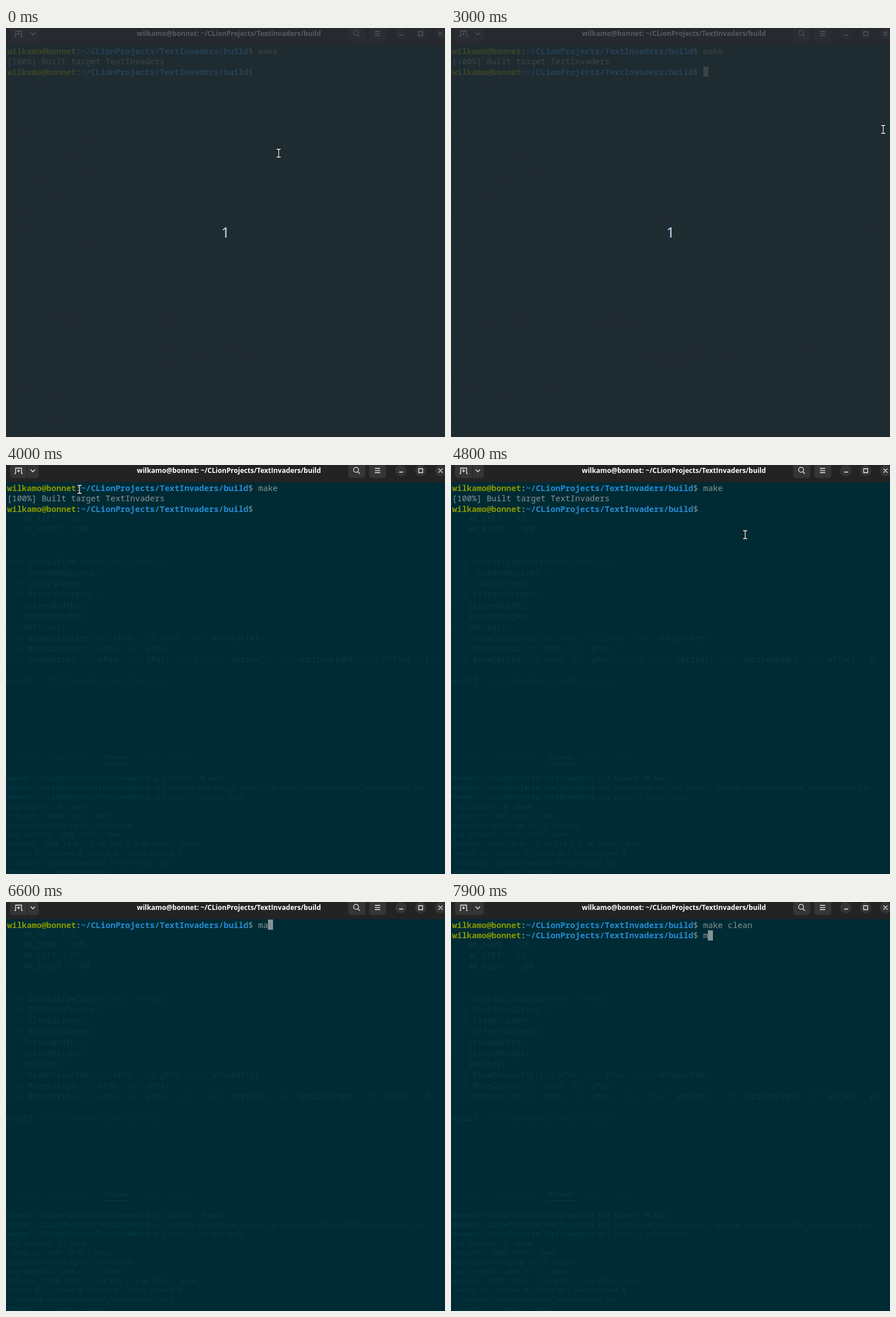
Write an HTML page with a canvas that moves like this. It is 776 by 722 pixels and loops after 8000 ms.

```html
<!DOCTYPE html>
<html lang="en">
<head>
<meta charset="utf-8">
<title>Terminal session</title>
<style>
html, body { margin: 0; width: 100%; height: 100%; overflow: hidden; background: #002b34; }
canvas { display: block; }
</style>
</head>
<body>
<canvas id="stage" width="776" height="722"></canvas>
<script>
const ctx = document.getElementById('stage').getContext('2d');
const LOOP = 8000, STEP = 100, REVEAL = 4000;
const MONO = '"Noto Sans Mono", monospace', SANS = '"Open Sans", sans-serif';
const USER = 'wilkamo', HOST = 'bonnet', PROJECT = '~/CLionProjects/TextInvaders';
const REPO = `https://github.com/${USER}/CPP_TextInvaders.git`;
const CELL = 8.7, LEFT = 2, TOP = 31.4, ROW = 18.3;
const GREY = '#839496', IDENT = '#0b3741', FAINT = '#07313b', ACCENT = '#0c3a44';

const CODE = [
  '    AK_UP = 119,', '    AK_DOWN = 115,', '    AK_LEFT = 97,', '    AK_RIGHT = 100', '};', '',
  'void InitializeCurses(bool nodelay);', 'void ShutdownCurses();', 'void ClearScreen();',
  'void RefreshScreen();', 'int ScreenWidth();', 'int ScreenHeight();', 'int GetChar();',
  'void DrawCharacter(int xPos, int yPos, char aCharacter);',
  'void MoveCursor(int xPos, int yPos);',
  'void DrawSprite(int xPos, int yPos, const char* sprite[], int spriteHeight, int offset = 0);',
  '', '#endif //TEXTINVADERS_CURSESUTILS_H'
];
const SHELL_PROMPT = `${USER}@${HOST}:${PROJECT}`;
const LOG = [
  '$ git branch -M main', `$ git remote add origin ${REPO}`, '$ git push -u origin main',
  'Enumerating objects: 8, done.', 'Counting objects: 100% (8/8), done.',
  'Delta compression using up to 16 threads', 'Compressing objects: 100% (7/7), done.',
  'Writing objects: 100% (8/8), 3.46 KiB | 3.46 MiB/s, done.',
  'Total 8 (delta 0), reused 0 (delta 0), pack-reused 0',
  `To ${REPO}`, ' * [new branch]      main -> main'
];
const TABS = [['OUTPUT', 18], ['DEBUG CONSOLE', 75], ['TERMINAL', 172], ['PORTS', 239], ['GITLENS', 289]];

// [time, text typed so far]
const CLEAR_KEYS = [[0, ''], [5500, 'c'], [5600, 'cl'], [5800, 'cle'], [5900, 'clea'], [6000, 'clear']];
const MAKE_KEYS = [[0, ''], [6600, 'ma'], [6800, 'mak'], [6900, 'make'], [7000, 'make '],
  [7100, 'make c'], [7200, 'make cle'], [7300, 'make clea'], [7400, 'make clean']];
const LAST_KEYS = [[0, ''], [7900, 'm']];
// [time, x, y]
const POINTER = [[0, 482, 221], [300, 460, 172], [1700, 460, 171], [1800, 694, 170], [2200, 790, 162],
  [2900, 820, 179], [3000, 764, 179], [3800, 256, 86], [3900, 160, 62], [4000, 130, 43],
  [4700, 520, 123], [5500, 520, 123]];

function text(str, x, y, font, color) {
  ctx.font = font;
  ctx.fillStyle = color;
  ctx.fillText(str, x, y);
}

function box(x, y, w, h, r, color) {
  ctx.fillStyle = color;
  ctx.beginPath();
  ctx.roundRect(x, y, w, h, r);
  ctx.fill();
}

function stroke(path, color = '#f0f0f0', width = 1.3) {
  ctx.strokeStyle = color;
  ctx.lineWidth = width;
  ctx.stroke(new Path2D(path));
}

const typedAt = (keys, t) => keys.filter(([at]) => at <= t).pop()[1];

function drawBackdrop(firstLine) {
  const font = '13.9px ' + MONO, cell = 8.35, x0 = -2.75;
  CODE.forEach((line, i) => {
    if (i < firstLine) return;
    for (const m of line.matchAll(/\/\/.*|#?\w+|[^\w\s]+/g)) {
      const dim = /^(void|int|bool|char|const|nodelay|\/\/.*|[^\w#]+)$/.test(m[0]);
      text(m[0], x0 + m.index * cell, 61 + i * 19.16, font, dim ? FAINT : IDENT);
    }
  });
  for (const [label, x] of TABS)
    text(label, x, 519.5, '9.5px ' + SANS, label === 'TERMINAL' ? ACCENT : FAINT);
  box(171, 526.5, 49, 1, 0, ACCENT);
  const small = '11.6px ' + MONO;
  LOG.forEach((line, i) => {
    const y = 557 + i * 16.53, isCommand = line[0] === '$';
    if (isCommand) text(SHELL_PROMPT, -52.6, y, 'bold ' + small, '#033742');
    text(line, isCommand ? -52.6 + SHELL_PROMPT.length * 6.97 : -52.6, y, small, IDENT);
  });
}

function drawTitleBar() {
  box(0, 0, 776, 30.5, 0, '#232323');
  box(7, -6, 51, 29, 5, '#353535');
  box(37, -6, 1, 29, 0, '#232323');
  box(605, -6, 30, 29, 5, '#353535');
  box(642, -6, 30, 29, 5, '#353535');
  for (const x of [698, 733, 768]) box(x - 10, 0, 20, 20, 10, '#353535');
  stroke('M17 15V5.5H27.5V15M15 15H17.5M27 15H29.5M22.2 7.5V13M19.5 10.3H25');
  stroke('M43.5 8L47.5 12L51.5 8');
  stroke('M623.2 8.5a4.4 4.4 0 1 1-8.8 0a4.4 4.4 0 1 1 8.8 0M622 12L625.5 15.5');
  stroke('M652 6H661.5M652 9.8H661.5M652 13.5H661.5');
  stroke('M695 12.5H702M729.5 6.5H736.5V13.5H729.5ZM764.5 6.5L771.5 13.5M771.5 6.5L764.5 13.5');
  ctx.textAlign = 'center';
  text(`${USER}@${HOST}: ${PROJECT}/build`, 394, 14, 'bold 12.1px ' + SANS, '#ffffff');
  ctx.textAlign = 'left';
}

function drawRow(row, str) {
  text(str, LEFT, 46 + row * ROW, '14.5px ' + MONO, GREY);
}

function drawPrompt(row, typed, caret = false) {
  const y = 46 + row * ROW, bold = 'bold 14.5px ' + MONO;
  let x = LEFT;
  const put = (str, font, color) => {
    text(str, x, y, font, color);
    x += str.length * CELL;
  };
  put(`${USER}@${HOST}`, bold, '#859900');
  put(':', bold, GREY);
  put(`${PROJECT}/build`, bold, '#268bd2');
  put('$ ' + typed, '14.5px ' + MONO, GREY);
  if (caret) box(Math.round(x), Math.round(TOP + row * ROW), 9, 18, 0, GREY);
}

function drawTerminal(t) {
  if (t < 6100) {
    const caret = t >= 5400 || Math.floor(t / 600) % 2 === 1;
    drawPrompt(0, 'make');
    drawRow(1, '[100%] Built target TextInvaders');
    drawPrompt(2, typedAt(CLEAR_KEYS, t), caret);
  } else {
    const entered = t >= 7500;
    drawPrompt(0, typedAt(MAKE_KEYS, t), !entered);
    if (entered) drawPrompt(1, typedAt(LAST_KEYS, t), true);
  }
}

function drawPointer(t) {
  const next = POINTER.findIndex(([at]) => at > t);
  if (next < 0) return;
  const [t0, x0, y0] = POINTER[next - 1], [t1, x1, y1] = POINTER[next];
  const k = (t - t0) / (t1 - t0);
  ctx.save();
  ctx.translate(Math.round(x0 + (x1 - x0) * k), Math.round(y0 + (y1 - y0) * k));
  const beam = 'M-3 -7H-1L0 -6L1 -7H3M0 -6V6M-3 7H-1L0 6L1 7H3';
  ctx.lineCap = 'square';
  stroke(beam, '#111', 3.2);
  stroke(beam, '#fff', 1.3);
  ctx.restore();
}

function draw(t) {
  box(0, 0, 776, 722, 0, '#002b34');
  drawBackdrop(t < 6100 ? 2 : t < 7500 ? 0 : 1);
  box(0, 31, 1, 691, 0, '#0a2a31');
  drawTitleBar();
  drawTerminal(t);
  if (t < REVEAL) {
    box(0, 0, 776, 722, 0, 'rgba(39, 44, 49, .78)');
    ctx.textAlign = 'center';
    text('1', 388, 370, '26px "Noto Sans", sans-serif', '#bcdcf4');
    ctx.textAlign = 'left';
  }
  drawPointer(t);
}

function tick() {
  const t = performance.now() % LOOP;
  draw(Math.floor(t / STEP) * STEP);
  requestAnimationFrame(tick);
}
tick();
</script>
</body>
</html>
```
